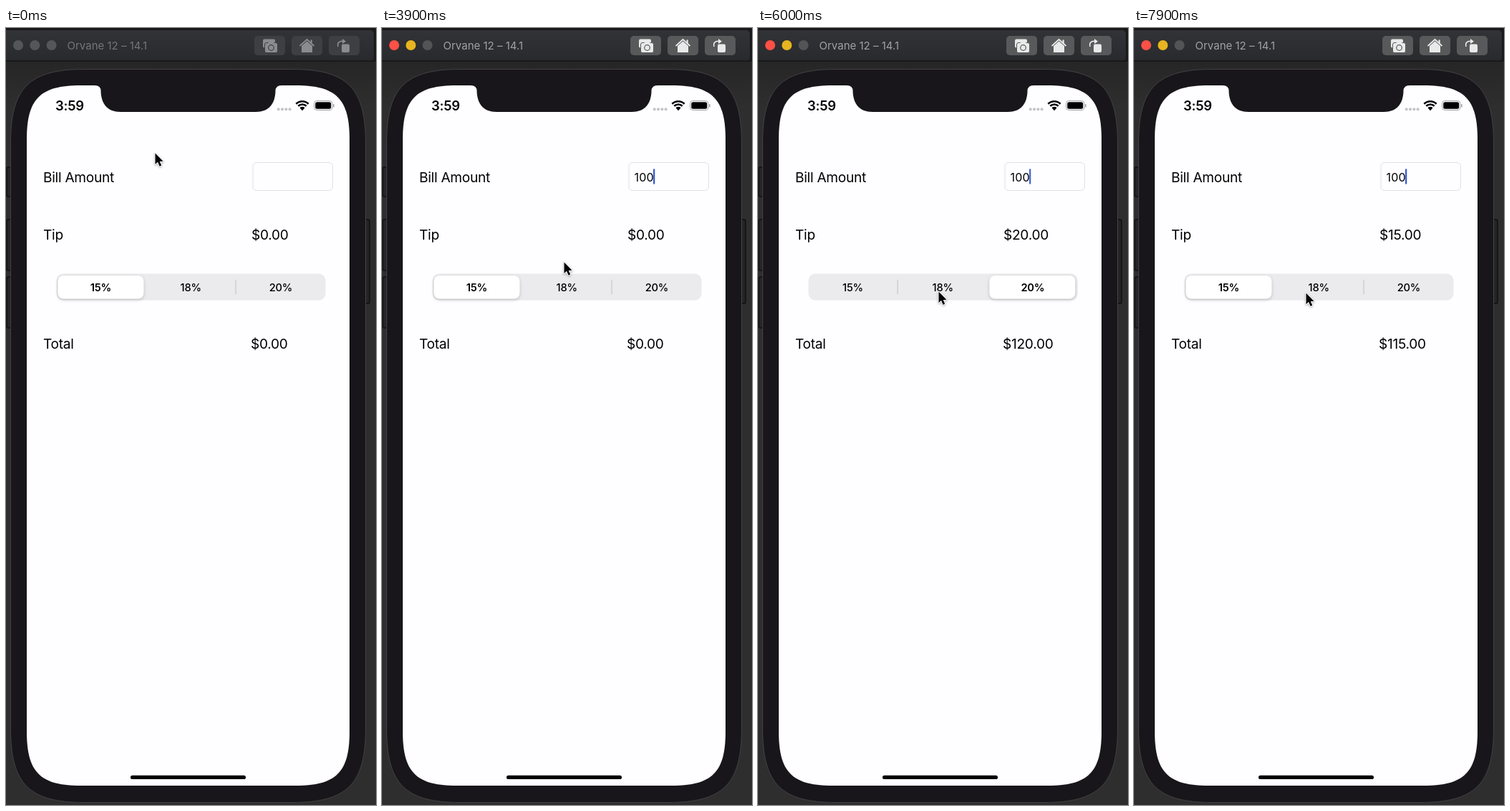
These frames come from a looping animation (517x1083 px, 8000 ms). An HTML page with a canvas:

```html
<!DOCTYPE html>
<html lang="en">
<head>
<meta charset="utf-8">
<title>Tip calculator</title>
<style>
html, body { margin: 0; width: 100%; height: 100%; overflow: hidden; background: #2d2c2c; }
canvas { display: block; width: 517px; height: 1083px; }
</style>
</head>
<body>
<canvas id="stage"></canvas>
<script>
const W = 517, H = 1083, LOOP = 8000, STEP = 100;
const canvas = document.getElementById('stage');
const dpr = window.devicePixelRatio || 1;
canvas.width = W * dpr;
canvas.height = H * dpr;
const c = canvas.getContext('2d');
c.scale(dpr, dpr);

const FONT = 'Inter, Roboto, sans-serif';
const RATES = [15, 18, 20];
const SEG_W = 125.4;
const FOCUS = 900, TYPE_START = 2200, TYPE_GAP = 150, BILL = '100';
const TYPE_END = TYPE_START + 2 * TYPE_GAP;

const clamp = v => Math.max(0, Math.min(1, v));
const smooth = p => p * p * (3 - 2 * p);
const easeOut = p => 1 - (1 - p) ** 2;
const lerp = (a, b, k) => a + (b - a) * k;
const mix = (a, b, k) => `rgb(${a.map((v, i) => Math.round(lerp(v, b[i], k)))})`;

// Places where the mouse arrives
const STOPS = [
  { at: 0, x: 208, y: 174 },
  { at: 450, x: 383, y: 206 },
  { at: 1300, x: 396, y: 208 },
  { at: 3600, x: 396, y: 208 },
  { at: 3900, x: 254, y: 326 },
  { at: 4300, x: 140, y: 358 },
  { at: 5100, x: 210, y: 346 },
  { at: 5750, x: 368, y: 365 },
  { at: 6000, x: 252, y: 367 },
  { at: 6700, x: 138, y: 364 },
  { at: 7500, x: 123, y: 381 },
  { at: 7900, x: 240, y: 369 }
];
const TAPS = [{ at: 5020, seg: 1 }, { at: 5600, seg: 2 }, { at: 6010, seg: 1 }, { at: 6827, seg: 0 }];

function mouseAt(t) {
  const i = STOPS.findIndex(s => s.at > t);
  const to = STOPS.at(i), from = STOPS.at(i < 0 ? -1 : i - 1);
  const travel = Math.min(400, to.at - from.at) || 1;
  const k = smooth(clamp(1 - (to.at - t) / travel));
  return [lerp(from.x, to.x, k), lerp(from.y, to.y, k)];
}

// The caret rests after each input, then fades out and in
function caretAt(t) {
  const d = t - (t < TYPE_START ? FOCUS : TYPE_END) - 560;
  if (d < 0) return 1;
  const p = d % 975;
  return Math.max(clamp(1 - p / 150), clamp((p - 300) / 150));
}

function pickAt(t) {
  const done = TAPS.filter(tap => tap.at <= t);
  const pos = done.reduce((p, { at, seg }) => lerp(p, seg, easeOut(clamp((t - at) / 300))), 0);
  return { pos, rate: done.length ? RATES[done.at(-1).seg] : 0 };
}

function paint(fill, line, lw = 1) {
  if (fill) { c.fillStyle = fill; c.fill(); }
  if (line) { c.strokeStyle = line; c.lineWidth = lw; c.stroke(); }
}

function box(x, y, w, h, r, fill, line, lw) {
  c.beginPath();
  c.roundRect(x, y, w, h, r);
  paint(fill, line, lw);
}

// Rectangle with continuous corners that reach e along each side
function squircle(x, y, w, h, e, fill, line) {
  const k = e / 4, r = x + w, b = y + h;
  c.beginPath();
  c.moveTo(x, y + e);
  c.bezierCurveTo(x, y + k, x + k, y, x + e, y);
  c.lineTo(r - e, y);
  c.bezierCurveTo(r - k, y, r, y + k, r, y + e);
  c.lineTo(r, b - e);
  c.bezierCurveTo(r, b - k, r - k, b, r - e, b);
  c.lineTo(x + e, b);
  c.bezierCurveTo(x + k, b, x, b - k, x, b - e);
  c.closePath();
  paint(fill, line);
}

function dot(x, y, r, fill) {
  c.beginPath();
  c.arc(x, y, r, 0, 7);
  paint(fill);
}

function shape(points, fill) {
  c.beginPath();
  points.forEach(p => c.lineTo(...p));
  c.closePath();
  paint(fill);
}

function label(str, x, y, size, { weight = 400, color = '#000', track = 0, align = 'left' } = {}) {
  c.font = `${weight} ${size}px ${FONT}`;
  c.letterSpacing = size * track + 'px';
  c.textAlign = align;
  c.fillStyle = color;
  c.fillText(str, x, y);
}

const body = (str, x, y) => label(str, x, y, 19.1, { track: -0.014 });

function cameraIcon(ink, back) {
  box(359, 15.5, 17, 12, 2, ink);
  box(361.5, 20.5, 18, 14, 2.5, ink, back);
  box(366.5, 18.5, 8, 4, 1.5, ink);
  dot(370.5, 27.5, 4.4, back);
  dot(370.5, 27.5, 3.2, ink);
}

function homeIcon(ink) {
  c.beginPath();
  c.moveTo(410.5, 25);
  c.lineTo(420.5, 16);
  c.lineTo(430.5, 25);
  paint(null, ink, 1.7);
  shape([[413, 25], [420.5, 18.5], [428, 25], [428, 34], [413, 34]], ink);
  c.fillRect(425.5, 16.5, 2.2, 5);
}

function rotateIcon(ink) {
  box(469, 22.5, 11, 11.5, 2, ink);
  c.beginPath();
  c.moveTo(464, 26);
  c.bezierCurveTo(462.5, 20, 466, 18, 471, 18.5);
  paint(null, ink, 1.6);
  shape([[470, 15], [475, 18.7], [470, 22]], ink);
}

function titleBar(k) {
  const g = c.createLinearGradient(0, 3, 0, 45);
  g.addColorStop(0, '#323337');
  g.addColorStop(1, '#292a2e');
  c.fillStyle = '#19191a';
  c.fillRect(0, 0, W, 47);
  box(-10, 3, 524, 42, [0, 5, 3, 0], g);

  const lights = [[255, 80, 70], [231, 181, 31], [83, 84, 86]];
  lights.forEach((on, i) => dot(17 + i * 23.3, 24, 7, mix([85, 86, 89], on, k)));
  label('Orvane 12 – 14.1', 85.5, 30, 15, { color: mix([116, 117, 120], [160, 161, 164], k) });

  const back = mix([62, 63, 67], [88, 89, 91], k);
  const ink = mix([139, 140, 143], [233, 233, 234], k);
  for (let i = 0; i < 3; i++) box(347 + i * 52, 11, 43, 27, 5, back);
  cameraIcon(ink, back);
  homeIcon(ink);
  rotateIcon(ink);
}

function sideButton(x, y, h) {
  box(x, y, 14, h, 2, '#262526', '#111012', 1.5);
}

function phone() {
  sideButton(1, 194, 41);
  sideButton(1, 267, 71);
  sideButton(1, 347, 71);
  sideButton(494, 267, 117);
  squircle(6.5, 57.5, 496, 1022, 103, '#18161a', '#424143');
  squircle(29, 80, 451, 976, 75, '#fefdff');

  // Notch
  c.beginPath();
  c.moveTo(124, 79);
  c.lineTo(124, 80);
  c.quadraticCurveTo(132.5, 80, 132.5, 88);
  c.bezierCurveTo(133, 106, 142, 117, 160, 117);
  c.lineTo(349, 117);
  c.bezierCurveTo(367, 117, 376, 106, 376.5, 88);
  c.quadraticCurveTo(376.5, 80, 385, 80);
  c.lineTo(385, 79);
  paint('#18161a');
  box(174, 1041.7, 161, 5.4, 2.7, '#000');
}

function statusBar() {
  label('3:59', 69, 115, 18.4, { weight: 600, track: -0.01 });
  for (let i = 0; i < 4; i++) dot(380.7 + i * 5.3, 113.3, 2, '#c3c2c5');

  // Wi-Fi fan
  const fan = [-2.35, -0.79];
  [12.3, 8.1].forEach(r => {
    c.beginPath();
    c.arc(414, 114.5, r, ...fan);
    paint(null, '#000', 2.5);
  });
  c.beginPath();
  c.moveTo(414, 115.3);
  c.arc(414, 114.8, 5, ...fan);
  paint('#000');

  box(430.5, 101.5, 25.5, 13, 4, null, '#a4a3a6');
  box(432.2, 103.2, 22, 9.6, 2.5, '#000');
  box(457, 106, 1.6, 4.5, 1, '#a4a3a6');
}

function amounts(rate) {
  const tip = rate * BILL / 100;
  const total = rate ? tip + +BILL : 0;
  body('Bill Amount', 52, 215);
  body('Tip', 52, 295);
  body('Total', 52, 446.5);
  body('$' + tip.toFixed(2), 343, 295);
  body('$' + total.toFixed(2), 342, 446.5);
}

function billField(t) {
  const typed = BILL.slice(0, Math.max(0, Math.floor((t - TYPE_START) / TYPE_GAP) + 1));
  box(345, 187.5, 111.5, 39, 5.5, '#fefdff', '#e1e0e5');
  label(typed, 352.5, 213.5, 16, { track: 0.01 });
  if (t < FOCUS) return;
  c.fillStyle = `rgba(52,92,212,${lerp(0.12, 1, caretAt(t))})`;
  c.fillRect(352.5 + c.measureText(typed).width - 0.7, 196.5, 2.3, 21);
}

function segments(pos) {
  box(70.5, 342.5, 376, 37, 9.5, '#ebeaec');
  // Each divider hides while the thumb is beside it
  [pos - 1, 1 - pos].forEach((k, i) => {
    c.fillStyle = `rgba(198,197,202,${clamp(k)})`;
    c.fillRect(194.5 + i * 126, 351, 1.2, 20);
  });
  c.save();
  c.shadowColor = 'rgba(0,0,0,0.2)';
  c.shadowBlur = 4 * dpr;
  c.shadowOffsetY = 1.5 * dpr;
  box(72.5 + pos * SEG_W, 345, 120, 32.5, 8, '#fff');
  c.restore();
  RATES.forEach((r, i) => {
    const weight = Math.abs(pos - i) < 0.05 ? 600 : 500;
    label(r + '%', 132.5 + i * 125.7, 366.5, 14.7, { weight, align: 'center', track: -0.015 });
  });
}

function mouse(x, y) {
  c.save();
  c.translate(x, y);
  c.lineJoin = 'round';
  c.shadowColor = 'rgba(0,0,0,0.35)';
  c.shadowBlur = 3 * dpr;
  c.shadowOffsetY = dpr;
  c.beginPath();
  [[0.5, 0.5], [0.5, 16], [4, 12.8], [6.6, 18.7], [9.2, 17.6], [6.7, 11.9], [11.6, 11.7]]
    .forEach(p => c.lineTo(...p));
  c.closePath();
  paint(null, '#fff', 2);
  c.shadowColor = 'transparent';
  paint('#000');
  c.restore();
}

function draw(t) {
  const bg = c.createLinearGradient(0, 46, 0, 110);
  bg.addColorStop(0, '#262627');
  bg.addColorStop(1, '#2f2e2e');
  c.fillStyle = bg;
  c.fillRect(0, 0, W, H);
  titleBar(t < 700 ? 0 : t < 1300 ? 0.85 : 1);
  phone();
  statusBar();
  const { pos, rate } = pickAt(t);
  amounts(rate);
  billField(t);
  segments(pos);
  mouse(...mouseAt(t));
}

let start;
function tick(now) {
  start ??= now;
  // The picture advances ten times a second
  draw(Math.floor(((now - start) % LOOP) / STEP) * STEP);
  requestAnimationFrame(tick);
}
requestAnimationFrame(tick);
</script>
</body>
</html>
```
